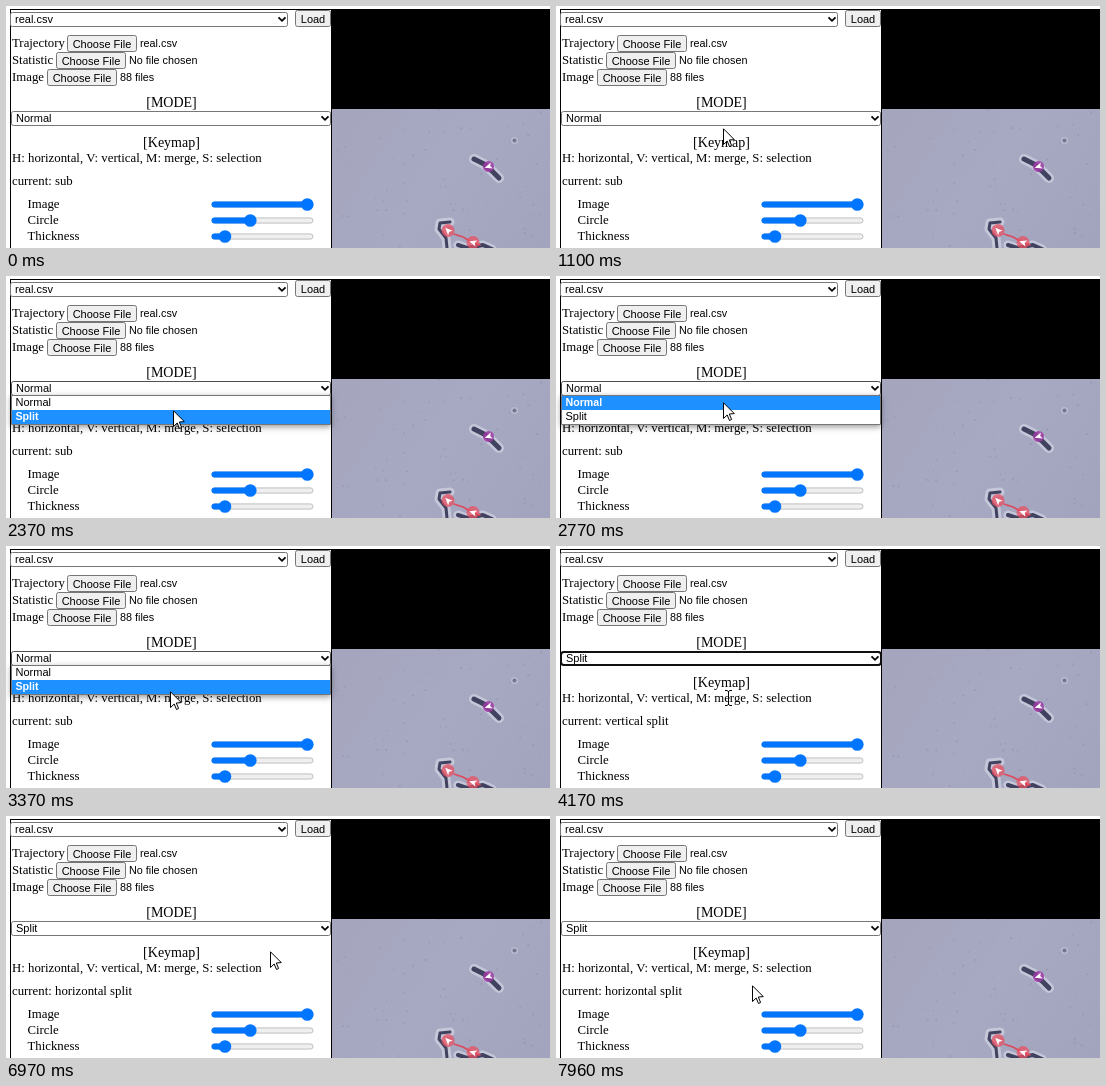
These frames come from a looping animation (544x242 px, 8 s). An HTML page with a canvas:

```html
<!DOCTYPE html>
<html lang="en">
<head>
<meta charset="utf-8">
<title>Trajectory editor</title>
<style>
html, body { margin: 0; width: 100%; height: 100%; overflow: hidden; background: #fff; }
canvas { display: block; width: 544px; height: 242px; }
</style>
</head>
<body>
<canvas id="stage"></canvas>
<script>
const W = 544, H = 242, LOOP = 8000;
const canvas = document.getElementById('stage');
const ratio = window.devicePixelRatio || 1;
canvas.width = W * ratio;
canvas.height = H * ratio;
const ctx = canvas.getContext('2d');
ctx.scale(ratio, ratio);

const SERIF = '"Liberation Serif", "Times New Roman", serif';
const SANS = '"Liberation Sans", Arial, sans-serif';
const BLUE = '#0075ff', EDGE = '#767676';

// Pointer positions: time, x, y, shape
const POINTER = [
  [800, 186, 199, 'arrow'], [900, 176, 164, 'arrow'], [1000, 169, 136, 'arrow'],
  [1100, 167, 122, 'arrow'], [1190, 167, 119, 'arrow'], [1290, 167, 117, 'arrow'],
  [1380, 167, 115, 'arrow'], [1480, 167, 114, 'arrow'], [1570, 167, 113, 'arrow'],
  [2270, 167, 124, 'arrow'], [2370, 167, 134, 'arrow'], [2770, 167, 126, 'arrow'],
  [3070, 167, 129, 'arrow'], [3170, 167, 133, 'arrow'], [3370, 164, 145, 'arrow'],
  [3870, 163, 143, 'arrow'], [3970, 162, 142, 'arrow'], [4170, 172, 152, 'beam'],
  [4570, 178, 152, 'beam'], [4670, 198, 151, 'beam'], [4770, 222, 147, 'beam'],
  [4870, 244, 141, 'arrow'], [4970, 257, 137, 'arrow'], [5070, 263, 135, 'arrow'],
  [5170, 264, 135, 'arrow'], [7860, 229, 153, 'arrow'], [7960, 196, 169, 'arrow']
];

const within = (t, a, b) => t >= a && t < b;

function text(str, x, y, size, font = SERIF, color = '#000', align = 'left', weight = '') {
  ctx.font = `${weight} ${size}px ${font}`;
  ctx.textAlign = align;
  ctx.fillStyle = color;
  ctx.fillText(str, x, y);
}

function rect(x, y, w, h, color) {
  ctx.fillStyle = color;
  ctx.fillRect(x, y, w, h);
}

function box(x, y, w, h, r, fill, stroke, line = 1) {
  ctx.beginPath();
  ctx.roundRect(x, y, w, h, r);
  ctx.fillStyle = fill;
  ctx.fill();
  ctx.strokeStyle = stroke;
  ctx.lineWidth = line;
  ctx.stroke();
}

function disc(x, y, r, color) {
  ctx.beginPath();
  ctx.arc(x, y, r, 0, Math.PI * 2);
  ctx.fillStyle = color;
  ctx.fill();
}

function path(points, color, width) {
  ctx.beginPath();
  points.forEach(([x, y]) => ctx.lineTo(x, y));
  ctx.strokeStyle = color;
  ctx.lineWidth = width;
  ctx.stroke();
}

function button(label, x, y, w) {
  box(x + .5, y + .5, w - 1, 16, 2, '#efefef', EDGE);
  text(label, x + w / 2, y + 13, 11, SANS, '#000', 'center');
}

function select(label, x, y, w, edge) {
  box(x + .5, y + .5, w - 1, 14, 2, '#fff', edge);
  text(label, x + 5, y + 11, 11, SANS);
  const cx = x + w - 6, cy = y + 7;
  path([[cx - 3.5, cy - 1.7], [cx, cy + 1.8], [cx + 3.5, cy - 1.7]], '#000', 1.8);
}

function fileRow(label, file, x, y) {
  text(label, 6, y + 12, 12.8);
  button('Choose File', x, y, 70);
  text(file, x + 73, y + 12, 10.8, SANS);
}

function slider(label, y, knob) {
  text(label, 21.5, y + 3.5, 12.8);
  box(206, y - 2.6, 101, 5.2, 2.6, '#efefef', '#b2b2b2', .8);
  ctx.beginPath();
  ctx.roundRect(205.5, y - 3, knob - 205.5, 6, 3);
  ctx.fillStyle = BLUE;
  ctx.fill();
  disc(knob, y, 6.3, BLUE);
}

function marker(x, y, r, color, turn) {
  disc(x, y, r, color);
  ctx.save();
  ctx.translate(x, y);
  ctx.rotate(turn);
  ctx.beginPath();
  ctx.moveTo(-4, 0);
  ctx.lineTo(3.5, -3.2);
  ctx.lineTo(1.8, 0);
  ctx.lineTo(3.5, 3.2);
  ctx.fillStyle = '#fff';
  ctx.fill();
  ctx.restore();
}

function cell(points, halo, body) {
  path(points, 'rgba(214,217,230,.65)', halo);
  path(points, '#40425f', body);
}

function specks(count) {
  let seed = 7;
  const rand = () => (seed = seed * 16807 % 2147483647) / 2147483647;
  for (let i = 0; i < count; i++) {
    disc(326 + rand() * 218, 103 + rand() * 139, .5 + rand() * .6, 'rgba(115,115,145,.25)');
  }
}

function microscope() {
  rect(326, 3, 218, 100, '#000');
  const g = ctx.createLinearGradient(326, 103, 544, 242);
  g.addColorStop(0, '#a5a5bd');
  g.addColorStop(.5, '#a7a8c2');
  g.addColorStop(1, '#a2a4be');
  rect(326, 103, 218, 139, g);

  ctx.save();
  ctx.beginPath();
  ctx.rect(326, 103, 218, 139);
  ctx.clip();
  ctx.lineCap = ctx.lineJoin = 'round';

  specks(70);
  disc(508.5, 134.5, 3.6, 'rgba(200,202,218,.55)');
  disc(508.5, 134.5, 2, '#73758f');

  cell([[468, 153], [478, 158], [486, 165], [493, 172]], 10, 5);
  marker(482.5, 160.5, 5.5, 'rgba(158,58,165,.85)', -.3);

  cell([[444, 216], [434, 217], [433, 223], [440, 232], [441, 242]], 9, 3);
  cell([[452, 239], [461, 242], [477, 239], [486, 243]], 9, 4);
  path([[448, 228], [457, 231], [464, 235], [474, 239]], '#dc4a5c', 1.6);
  marker(442, 224.5, 6.5, 'rgba(232,80,98,.75)', .8);
  marker(467, 236.5, 6.5, 'rgba(232,80,98,.75)', .3);
  ctx.restore();
}

function dropdown(pick) {
  ctx.save();
  ctx.shadowColor = 'rgba(0,0,0,.4)';
  ctx.shadowBlur = 6 * ratio;
  ctx.shadowOffsetY = 2 * ratio;
  rect(5, 119, 320, 30, '#fff');
  ctx.restore();
  box(5.5, 119.5, 319, 29, 0, '#fff', EDGE);
  ['Normal', 'Split'].forEach((name, i) => {
    const on = name === pick, y = 120 + i * 14;
    if (on) rect(6, y, 318, 14, '#1e90ff');
    text(name, 9.5, y + 10, on ? 10.67 : 11, SANS, on ? '#fff' : '#000', 'left', on ? 'bold' : '');
  });
}

function drawPointer([, x, y, shape]) {
  ctx.save();
  ctx.translate(x, y);
  if (shape === 'beam') {
    path([[-3, -7.5], [-1, -7.5], [.5, -6.5], [2, -7.5], [4, -7.5]], '#000', 1);
    path([[.5, -7], [.5, 7]], '#000', 1);
    path([[-3, 7.5], [-1, 7.5], [.5, 6.5], [2, 7.5], [4, 7.5]], '#000', 1);
  } else {
    ctx.beginPath();
    [[.5, .8], [.5, 16.5], [4.2, 13], [6.5, 18.5], [8.6, 17.5], [6.3, 12], [11.3, 11.6]]
      .forEach(([px, py]) => ctx.lineTo(px, py));
    ctx.closePath();
    ctx.fillStyle = '#fff';
    ctx.fill();
    ctx.strokeStyle = '#000';
    ctx.lineWidth = 1;
    ctx.stroke();
  }
  ctx.restore();
}

function draw(t) {
  const split = t >= 4170;
  const state = t >= 6970 ? 'horizontal split' : split ? 'vertical split' : 'sub';

  rect(0, 0, W, H, '#fff');
  rect(4, 3, 540, 1, '#000');
  rect(4, 3, 1, 239, '#000');
  rect(325, 3, 1, 239, '#000');
  microscope();

  select('real.csv', 4, 6, 278, EDGE);
  button('Load', 289, 4, 36);
  fileRow('Trajectory', 'real.csv', 61, 29);
  fileRow('Statistic', 'No file chosen', 50, 46);
  fileRow('Image', '88 files', 41, 63);

  text('[MODE]', 165.5, 101, 14, SERIF, '#000', 'center');
  select(split ? 'Split' : 'Normal', 5, 105, 320, within(t, 1190, 4170) ? '#4f4f4f' : EDGE);
  if (within(t, 4170, 5170)) {
    ctx.beginPath();
    ctx.roundRect(5, 106, 320, 13, 3);
    ctx.strokeStyle = '#101010';
    ctx.lineWidth = 2;
    ctx.stroke();
  }

  text('[Keymap]', 165.5, 141, 14, SERIF, '#000', 'center');
  text('H: horizontal, V: vertical, M: merge, S: selection', 6, 156, 12.8);
  text('current: ' + state, 6, 179, 12.8);
  slider('Image', 198.5, 301.3);
  slider('Circle', 214.5, 244.3);
  slider('Thickness', 230.5, 219);

  if (within(t, 1870, 4170)) {
    const onSplit = within(t, 2370, 2770) || t >= 3370;
    dropdown(onSplit ? 'Split' : 'Normal');
  }

  const spot = POINTER.filter(p => p[0] <= t).pop();
  if (spot) drawPointer(spot);
}

const start = performance.now();
function tick() {
  draw((performance.now() - start) % LOOP);
  requestAnimationFrame(tick);
}
tick();
</script>
</body>
</html>
```
